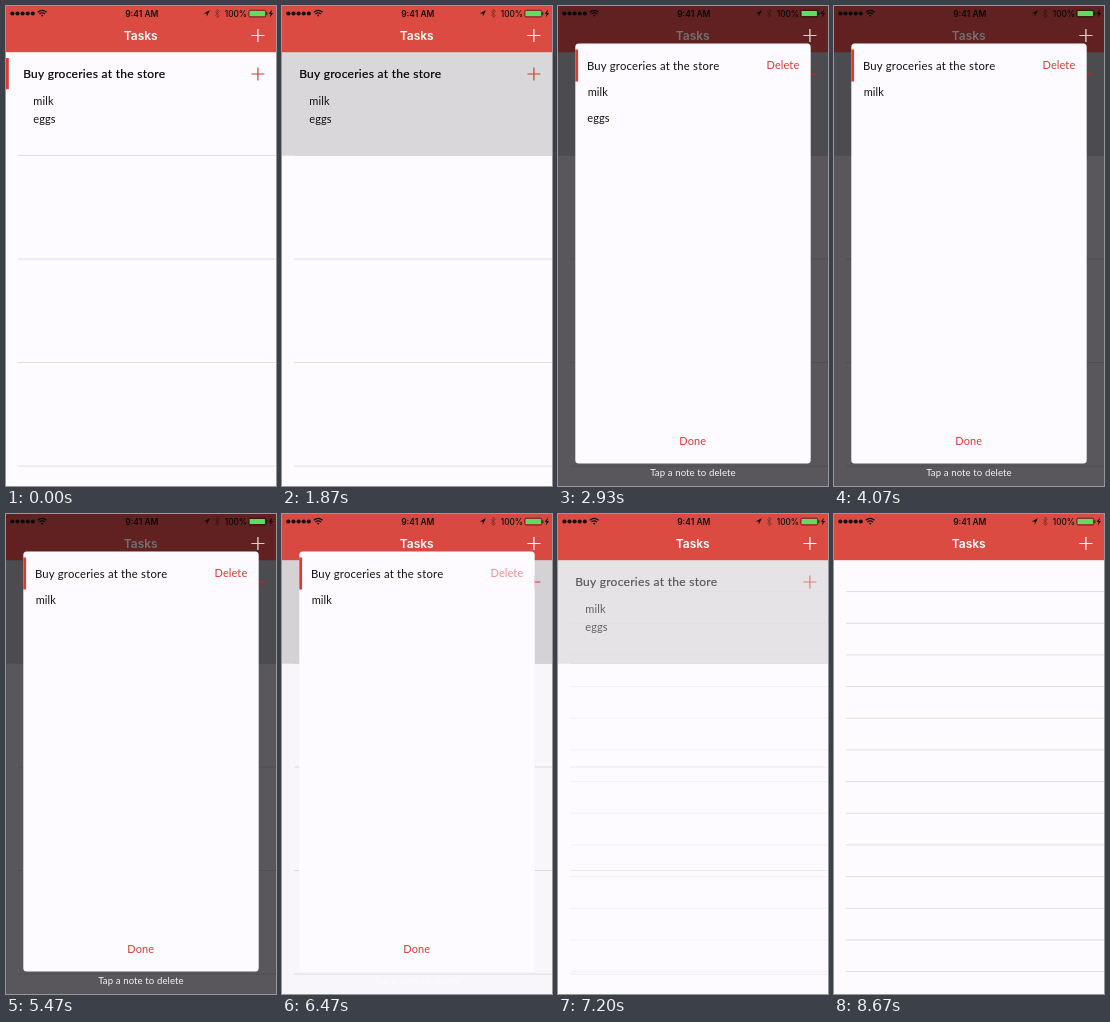
Write an HTML page that moves like this. It is 270 by 480 pixels and loops after 8.94 s.

```html
<!DOCTYPE html>
<html lang="en">
<head>
<meta charset="utf-8">
<title>Tasks</title>
<style>
  html, body { margin: 0; height: 100%; overflow: hidden; background: #fdfbff; }
  svg { display: block; width: 100vw; height: 100vh; }
  text { font-family: Lato, sans-serif; font-size: 11px; letter-spacing: .1px; fill: #111; }
  .bar text { font-family: Inter, sans-serif; font-weight: 600; letter-spacing: 0; }
  .red { fill: #da3a33; }
  .plus { fill: none; stroke-width: 1.2; }
  .lines { stroke: #e0dee2; stroke-width: 1; }
</style>
</head>
<body>
<svg viewBox="0 0 270 480">
  <rect width="270" height="480" fill="#fdfbff"/>
  <path id="wide" class="lines"/>
  <path id="narrow" class="lines"/>

  <g id="row">
    <rect id="shade" y="46" width="270" height="103.7" fill="#d9d7da"/>
    <rect id="mark" class="red" y="52" width="2.8" height="31.2"/>
    <text x="17.2" y="71.5" style="font-size:12px;letter-spacing:.29px;fill:#000;stroke:#000;stroke-width:.2">Buy groceries at the store</text>
    <text x="27.3" y="98.5">milk</text>
    <text x="27.3" y="117">eggs</text>
    <path class="plus" stroke="#da3a33" d="M245.4 68h13M251.9 61.5v13"/>
  </g>

  <g class="bar">
    <rect width="270" height="46.2" fill="#db4b42"/>
    <g id="dots"></g>
    <g fill="none" stroke="#111" stroke-width="1.2">
      <path d="M31.8 6.2q4.4-3.6 8.8 0M33.4 8q2.8-2.2 5.6 0"/>
      <path d="M209 5.3l4.4 4.4-2.3 2V3.3l2.3 2L209 9.7" stroke="#7a302b" stroke-width=".8"/>
    </g>
    <path d="M34.9 9.2q1.3-1 2.6 0l-1.3 1.6zM204 4l-6.3 3.6h3v3.2zM266 3.6l-3.3 4.2h1.9l-.8 3.6 3.3-4.5h-1.9z" fill="#111"/>
    <text x="135.8" y="10.5" text-anchor="middle" style="font-size:8.5px">9:41 AM</text>
    <text x="218.7" y="10.5" style="font-size:8.3px;font-weight:500">100%</text>
    <rect x="242.8" y="4.2" width="17" height="6.8" rx="1.3" fill="none" stroke="#222" stroke-width=".7"/>
    <path d="M260.8 6.2v2.8" stroke="#222"/>
    <rect x="243.7" y="5.1" width="15.2" height="5" rx=".5" fill="#5fdd62"/>
    <text x="134.7" y="34.2" text-anchor="middle" style="font-size:12px;fill:#fff">Tasks</text>
    <path class="plus" stroke="#fff" d="M245.4 29.5h13M251.9 23v13"/>
  </g>

  <g id="dim" fill="#030006">
    <rect id="dimBar" width="270" opacity=".56"/>
    <rect id="dimBody" width="270" height="480" opacity=".65"/>
    <g id="bright">
      <rect x="243.7" y="5.1" width="15.2" height="5" rx=".5" fill="#5fdd62"/>
      <path class="plus" stroke="#e6c9c8" d="M245.4 29.5h13M251.9 23v13"/>
      <path class="plus" stroke="#c8332d" d="M245.4 68h13"/>
    </g>
    <text id="hint" x="135" y="469.5" text-anchor="middle" style="font-size:9.6px;fill:#f4f2f5">Tap a note to delete</text>
  </g>

  <g id="card">
    <rect x="17.3" y="37.5" width="235.4" height="420" rx="3.5" fill="#fdfbff"/>
    <rect class="red" x="17.3" y="43.5" width="2.8" height="32"/>
    <text x="28.9" y="63.5" style="font-size:11.3px;letter-spacing:.22px">Buy groceries at the store</text>
    <text id="del" class="red" x="241.3" y="63.2" text-anchor="end">Delete</text>
    <text x="29.7" y="90">milk</text>
    <text id="eggs" x="29.3" y="116">eggs</text>
    <text class="red" x="134.8" y="439" text-anchor="middle">Done</text>
  </g>
</svg>
<script>
const LOOP = 8940, HEIGHT = 480, BAR = 46;
const RISE = 1891, FALL = 6568;
const $ = id => document.getElementById(id);
const set = (id, name, value) => $(id).setAttribute(name, value);
const ramp = (t, a, b) => Math.min(1, Math.max(0, (t - a) / (b - a)));
const smooth = x => x * x * (3 - 2 * x);

// Share of the way left for a critically damped spring
const spring = ms => {
  const x = Math.max(0, ms) * 0.0175;
  return (1 + x) * Math.exp(-x);
};

const rules = (count, step) =>
  Array.from({ length: count }, (_, i) => `M12 ${BAR - 0.1 + step * (i + 1)}H270`).join('');
set('wide', 'd', rules(4, 103.55));
set('narrow', 'd', rules(13, 31.67));
$('dots').innerHTML = [0, 1, 2, 3, 4].map(i => `<circle cx="${6.4 + i * 5.1}" cy="7.5" r="2.1" fill="#111"/>`).join('');

function draw(t) {
  const offset = HEIGHT * (t < FALL ? spring(t - RISE) : 1 - spring(t - FALL));
  const open = t > RISE && t < 7030;
  const cleared = smooth(ramp(t, 7070, 7400));
  const selected = t >= 1800;

  set('shade', 'opacity', +selected);
  set('mark', 'opacity', +!selected);
  set('row', 'opacity', 1 - cleared);
  set('wide', 'opacity', 1 - cleared);
  set('narrow', 'opacity', cleared);

  set('dim', 'opacity', open ? 1 - smooth(ramp(t, 6200, 6500)) : 0);
  set('dimBar', 'y', offset);
  set('dimBar', 'height', Math.max(0, BAR - offset));
  set('dimBody', 'y', Math.max(BAR, offset));
  set('bright', 'opacity', +(offset < 5));
  set('hint', 'transform', `translate(0 ${offset})`);

  set('card', 'opacity', +open);
  set('card', 'transform', `translate(0 ${offset})`);
  set('eggs', 'opacity', 1 - smooth(ramp(t, 3700, 4050)));
  set('del', 'opacity', t < 6130 ? 1 : 0.2 + 0.8 * ramp(t, 6250, 6750));
}

const start = performance.now();
function tick() {
  draw((performance.now() - start) % LOOP);
  requestAnimationFrame(tick);
}
tick();
</script>
</body>
</html>
```
